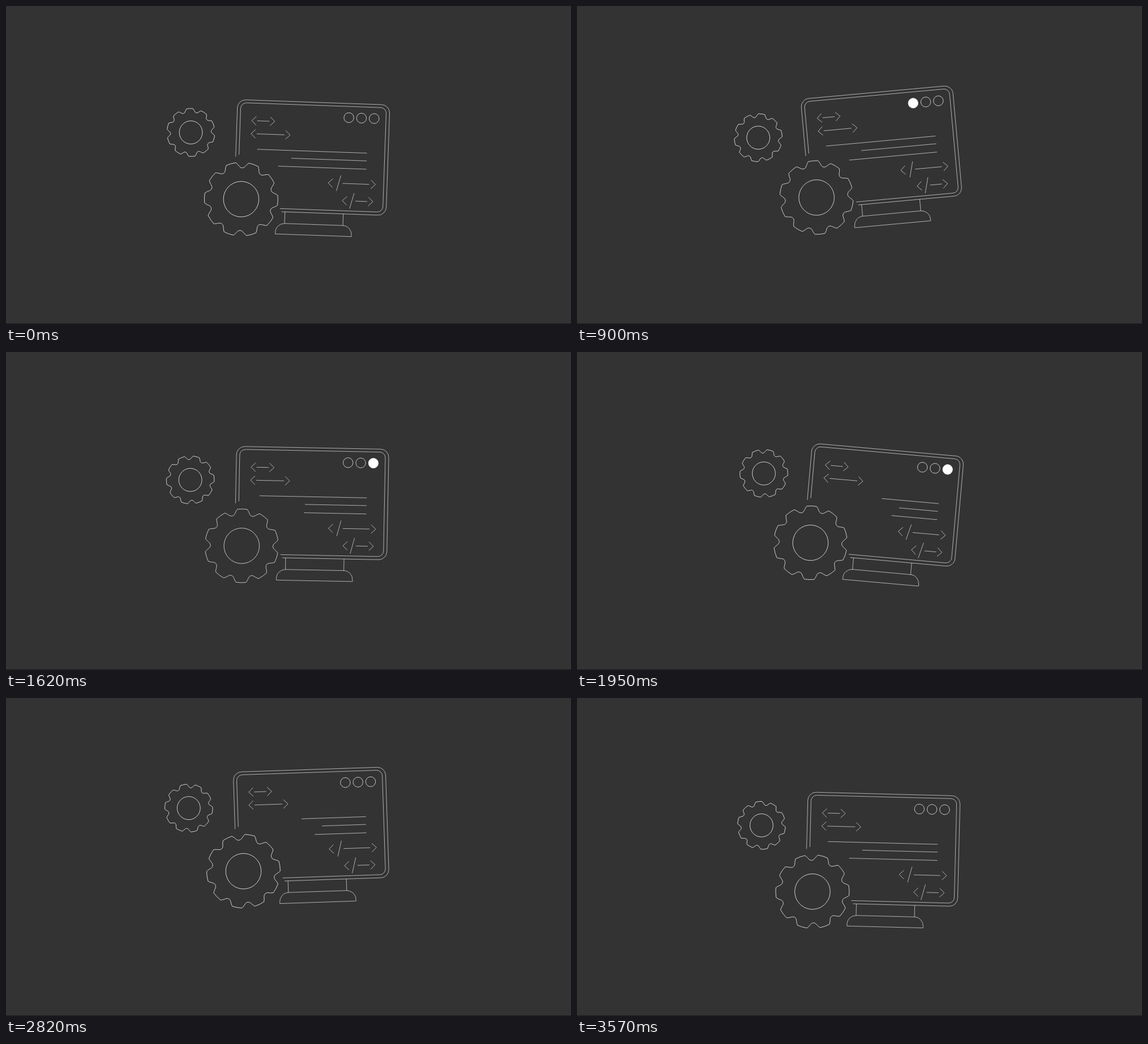
Animation of 998 by 561 pixels, one loop 3.6 s. Source, as an HTML page:

```html
<!DOCTYPE html>
<html lang="en">
<head>
<meta charset="utf-8">
<title>Code and gears</title>
<style>
  html, body { margin: 0; height: 100%; overflow: hidden; background: #333; }
  svg { display: block; width: 100vw; height: 100vh; }
  #scene { fill: none; stroke: #fff; stroke-width: .6; }
  .gear, .dot { stroke-width: .7; }
  .dot { fill: #fff; }
</style>
</head>
<body>
<svg viewBox="0 0 998 561">
  <rect y="560.5" width="998" height=".5"/>
  <g id="scene"></g>
</svg>
<script>
const LOOP = 3600, STEP = 30, TEETH = 10;
const scene = document.getElementById('scene');

function add(tag, attrs, parent = scene) {
  const el = document.createElementNS('http://www.w3.org/2000/svg', tag);
  for (const key in attrs) el.setAttribute(key, attrs[key]);
  return parent.appendChild(el);
}

const clamp = u => Math.min(1, Math.max(0, u));
const swing = u => (1 - Math.cos(Math.PI * clamp(u))) / 2;
const mix = (a, b, u) => a + (b - a) * u;

// Monitor: two open rounded frames, interrupted by the large gear
function bezel(left, top, right, bottom, r, startY, endX) {
  const corner = (dx, dy) => `a${r} ${r} 0 0 1 ${dx * r} ${dy * r}`;
  return `M${left} ${startY}V${top + r}${corner(1, -1)}H${right - r}${corner(1, 1)}` +
    `V${bottom - r}${corner(-1, 1)}H${endX}`;
}
const stand = 'M-3.4 82.8V103.3M99.7 82.8V103.3' +
  'M-19.1 122.3v-3a16 16 0 0 1 16-16H99.4a16 16 0 0 1 16 16v3z';
add('path', {
  d: bezel(-93.8, -112.2, 175.2, 82.8, 14.5, -11.7, -9.4) +
     bezel(-88, -107, 169.2, 77.3, 10, -15.3, -12.5) + stand
});

// Code tags: two brackets around a line, optionally with a slash
function codeTag(left, from, to, right, y, slash) {
  const bracket = (x, dx) => `M${x + dx} ${y - 7.7}L${x} ${y}L${x + dx} ${y + 7.7}`;
  const stroke = slash ? `M${slash + 3.6} ${y - 14}l-7.2 27.6` : '';
  add('path', { d: bracket(left, 8) + `M${from} ${y}H${to}` + bracket(right, -8) + stroke });
}
codeTag(-67.6, -58, -36.6, -27, -76);
codeTag(-68.1, -58, -9, 1, -53);
codeTag(71.1, 96.6, 143.6, 154.6, 29.1, 89.6);
codeTag(97.2, 120.2, 141.2, 151.2, 59.5, 114);

// Code lines shrink in two moves, then grow back, four times per loop
function codeLine(y, full, floor, grown) {
  const path = add('path');
  return t => {
    const p = t * 4 / LOOP % 1;
    const shrunk = 1 - .6 * (1 - (1 - clamp(p / .3)) ** 2) - .34 * swing((p - .5) / .14);
    const regrown = mix(floor, 1, swing((p - .62) / (grown - .62)));
    path.setAttribute('d', `M137.7 ${y}h${-full * Math.max(shrunk, regrown)}`);
  };
}

function gear(x, y, radius, hole, phase) {
  const at = (deg, r) => {
    const a = deg * Math.PI / 180;
    return `${r * radius * Math.cos(a)} ${r * radius * Math.sin(a)}`;
  };
  const pitch = 360 / TEETH, half = 10.3;
  let d = `M${at(-half, 1)}`;
  for (let a = 0; a < 360; a += pitch) {
    d += `C${at(a - 5.5, .93)} ${at(a - 5, .85)} ${at(a, .85)}` +
         `C${at(a + 5, .85)} ${at(a + 5.5, .93)} ${at(a + half, 1)}` +
         `A${radius} ${radius} 0 0 1 ${at(a + pitch - half, 1)}`;
  }
  const el = add('g', { class: 'gear' });
  add('path', { d: d + 'Z' }, el);
  add('circle', { r: hole }, el);
  return t => el.setAttribute('transform', `translate(${x} ${y}) rotate(${phase + t * 360 / LOOP})`);
}

// Dots light up one after the other
function dot(i) {
  const el = add('circle', { class: 'dot', cx: 103.6 + 22.35 * i, cy: -87.2, r: 8.7 });
  return t => el.setAttribute('fill-opacity', Math.floor((t - 420) / 520) === i ? 1 : 0);
}

const parts = [
  codeLine(-25.8, 194, 0, .82), codeLine(-12.1, 133, 0, .87), codeLine(2.6, 156, .27, .94),
  gear(-174.4, -51.4, 42.3, 20.4, 31.2), gear(-81.5, 63.1, 65, 31.3, 17.9),
  dot(0), dot(1), dot(2)
];

// Turning points of the sway: time, degrees
const sway = [[-173, -.7], [67, 2.6], [270, -1.7], [565, 7], [1070, -9.4], [1320, 1.1], [1610, 1.1],
  [1940, 5.1], [2577, -6.8], [2795, -1.6], [3000, -10.3], [3245, 7.5], [3427, -.7], [3667, 2.6]];

function tilt(t) {
  const i = sway.findIndex(([time]) => time > t);
  const [t0, a] = sway[i - 1], [t1, b] = sway[i];
  return mix(a, b, swing((t - t0) / (t1 - t0)));
}

const hop = (t, peak, reach, height) => -height * swing(1 - Math.abs(t - peak) / reach);

function draw(t) {
  const y = 284 + hop(t, 585, 485, 44.1) + hop(t, 2760, 420, 42.4);
  scene.setAttribute('transform', `translate(492 ${y}) rotate(${tilt(t)}) translate(6.9 -3.7)`);
  parts.forEach(update => update(t));
}

function frame(now) {
  draw(Math.floor(now / STEP) * STEP % LOOP);
  requestAnimationFrame(frame);
}
draw(0);
requestAnimationFrame(frame);
</script>
</body>
</html>
```
